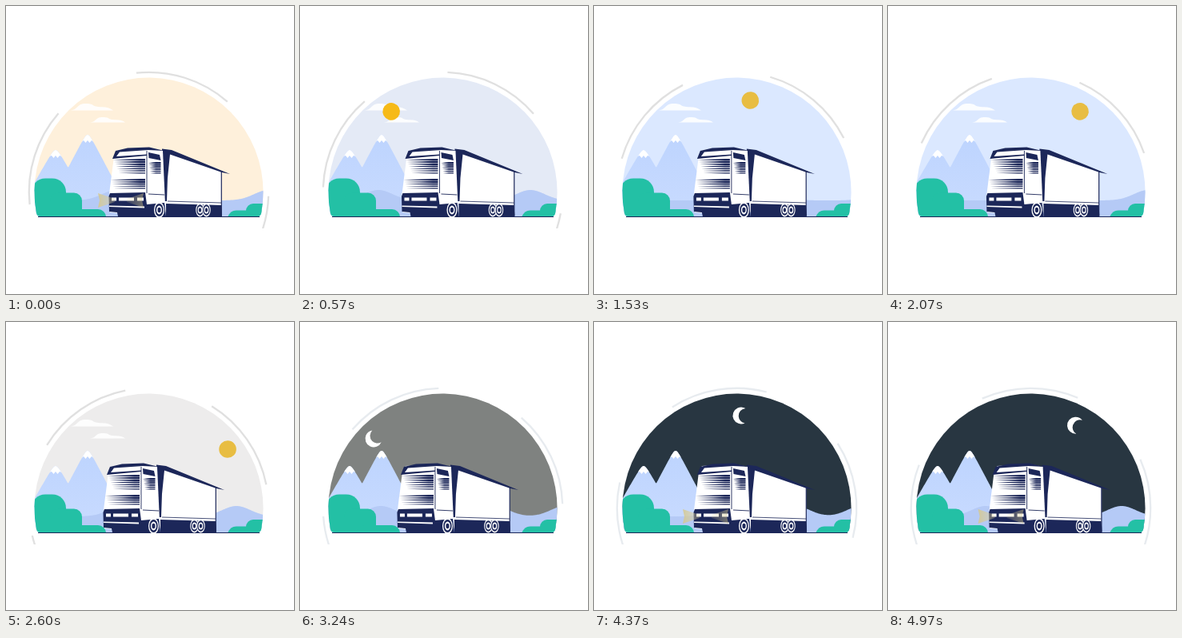
An HTML page with a canvas that plays this animation: 360 px wide and 360 px high, repeating every 5.01 s.

```html
<!DOCTYPE html>
<html lang="en">
<head>
<meta charset="utf-8">
<title>Truck, day and night</title>
<style>
html, body { margin: 0; width: 100%; height: 100%; overflow: hidden; background: #fff; }
canvas { display: block; width: 100vmin; height: 100vmin; }
</style>
</head>
<body>
<canvas id="stage" width="360" height="360"></canvas>
<script>
const ctx = document.getElementById('stage').getContext('2d');
const LOOP = 5.01, GROUND = 263;
const NAVY = '#1c2759', TEAL = '#23c0a5', WHITE = '#fff';
const CREAM = [254, 240, 219], BLUE = [219, 232, 255], NIGHT = [40, 54, 65];
const DOME = { x: 178.5, y: 232.5, r: 143 };
const rad = deg => deg * Math.PI / 180;
const ramp = (t, a, b) => Math.min(1, Math.max(0, (t - a) / (b - a)));
const mix = (a, b, k) => a.map((v, i) => v + (b[i] - v) * k);
const rgb = c => `rgb(${c.map(Math.round).join(',')})`;

function poly(color, ...p) {
  ctx.fillStyle = color;
  ctx.beginPath();
  for (let i = 0; i < p.length; i += 2) ctx.lineTo(p[i], p[i + 1]);
  ctx.fill();
}

function line(width, ...p) {
  ctx.strokeStyle = NAVY;
  ctx.lineWidth = width;
  ctx.beginPath();
  for (let i = 0; i < p.length; i += 2) ctx.lineTo(p[i], p[i + 1]);
  ctx.stroke();
}

function oval(color, x, y, rx, ry = rx) {
  ctx.fillStyle = color;
  ctx.beginPath();
  ctx.ellipse(x, y, rx, ry, 0, 0, 7);
  ctx.fill();
}

// Fills the land below y = height(x).
function land(color, from, to, height) {
  ctx.fillStyle = color;
  ctx.beginPath();
  ctx.moveTo(from, 270);
  for (let x = from; x <= to; x++) ctx.lineTo(x, height(x));
  ctx.lineTo(to, 270);
  ctx.fill();
}

function skyColor(t) {
  if (t < 2.2) return mix(CREAM, BLUE, ramp(t, 0, 0.76));
  if (t < 2.98) return mix(BLUE, CREAM, ramp(t, 2.2, 2.98));
  return mix(CREAM, NIGHT, ramp(t, 2.98, 3.42));
}

function rings(t) {
  ctx.save();
  ctx.beginPath();
  ctx.rect(0, 0, 360, 278);
  ctx.clip();
  ctx.lineWidth = 2.3;
  ctx.strokeStyle = rgb(mix([224, 224, 224], [231, 235, 239], ramp(t, 2.6, 3.2)));
  for (const start of [-188, -96, -6, 92]) {
    const a = start - 90 + 14.5 * t;
    ctx.beginPath();
    ctx.arc(DOME.x, DOME.y, 149.7, rad(a), rad(a + 47));
    ctx.stroke();
  }
  ctx.restore();
}

// Sun and moon share one circular track.
function onTrack(deg, alpha, draw) {
  if (alpha <= 0) return;
  ctx.save();
  ctx.globalAlpha = alpha;
  ctx.translate(177.2, 256);
  ctx.rotate(rad(deg));
  ctx.translate(0, -139.2);
  draw();
  ctx.restore();
}

function sun(t) {
  const color = rgb(mix([246, 186, 24], [232, 189, 66], ramp(t, 0.6, 1.5)));
  onTrack(35.85 * t - 47.4, ramp(t, 0.05, 0.3) * (1 - ramp(t, 2.9, 3.2)),
    () => oval(color, 0, 0, 10.8));
}

function moon(t) {
  const R = 10.5, r = 9.3, gap = 6;
  onTrack(35.85 * t - 153.9, ramp(t, 2.95, 3.2), () => {
    const tip = Math.acos((R * R + gap * gap - r * r) / (2 * R * gap));
    const inner = Math.atan2(R * Math.sin(tip), R * Math.cos(tip) - gap);
    ctx.fillStyle = WHITE;
    ctx.beginPath();
    ctx.arc(0, 0, R, tip, -tip);
    ctx.arc(gap, 0, r, -inner, inner, true);
    ctx.fill();
  });
}

function cloud(x, y, w, h) {
  ctx.fillStyle = WHITE;
  ctx.beginPath();
  ctx.moveTo(x, y);
  ctx.bezierCurveTo(x + w * 0.25, y, x + w * 0.15, y - h, x + w * 0.4, y - h);
  ctx.bezierCurveTo(x + w * 0.6, y - h, x + w * 0.5, y - h / 2, x + w * 0.75, y - h / 2);
  ctx.quadraticCurveTo(x + w * 0.9, y - h / 2, x + w, y);
  ctx.fill();
}

function mountains() {
  const peaks = [{ x: 62, y: 180, slope: 1.75 }, { x: 102, y: 161, slope: 1.92 }];
  const side = (p, x) => p.y + Math.hypot(p.slope * (x - p.x), 6) - 6;
  const g = ctx.createLinearGradient(0, 160, 0, GROUND);
  g.addColorStop(0, '#bdd4fe');
  g.addColorStop(1, '#c9dbff');
  land(g, 30, 160, x => Math.min(...peaks.map(p => side(p, x))));
  for (const p of peaks) {
    ctx.fillStyle = WHITE;
    ctx.beginPath();
    for (let dx = -7; dx <= 7; dx++) ctx.lineTo(p.x + dx, side(p, p.x + dx));
    for (let dx = 5; dx >= -5; dx -= 2.5) {
      ctx.lineTo(p.x + dx, p.y + (dx % 5 ? 10 : 7));
    }
    ctx.fill();
  }
}

const CRESTS = [138, 328, 470, 558, 640];

function hills(t) {
  const shift = 70 * t;
  land('#b5caf6', 30, 325, x =>
    CRESTS.reduce((y, c) => y - 13 * Math.exp(-(((x + shift - c) / 25) ** 2)), 243));
}

function bush(x, y, w, r) {
  ctx.fillStyle = TEAL;
  ctx.beginPath();
  ctx.roundRect(x, y, w, 80, r);
  ctx.fill();
}

function scenery(t) {
  mountains();
  hills(t);
  bush(32, 215.5, 43, 17);
  bush(55, 233.5, 40, 10);
  bush(70, 254, 55, 10);
  bush(277, 255.5, 60, 11);
  bush(300, 247, 60, 9);
}

// Stripes that get thinner and shorter towards the bottom.
function hatch(left, right, top, bottom, rows, inset) {
  const step = (bottom - top) / rows;
  for (let i = 0; i < rows; i++) {
    const y = top + i * step, h = step * (0.9 - 0.5 * i / rows);
    poly(NAVY, left + inset * i / rows, y + h / 2, right - 6, y, right, y, right, y + h, right - 6, y + h);
  }
}

function wheel(x, rx, ry) {
  [[WHITE, 1.25], [NAVY, 1], [WHITE, 0.68], [NAVY, 0.4]]
    .forEach(([color, k]) => oval(color, x, 255, rx * k, ry * k));
}

function beam(x, dir, alpha) {
  const g = ctx.createLinearGradient(x, 0, x + dir * 21, 0);
  g.addColorStop(0, 'rgba(222,208,150,.25)');
  g.addColorStop(1, 'rgba(214,200,140,.85)');
  ctx.globalAlpha = alpha;
  poly(g, x, 241, x + dir * 21, 234, x + dir * 19, 243, x + dir * 21, 252, x, 245);
  ctx.globalAlpha = 1;
}

function trailer() {
  poly(WHITE, 199, 181, 269.5, 207, 269.5, 255, 199, 258);
  poly(NAVY, 195, 178.5, 207, 180, 280, 210, 270, 208, 205, 185.5, 202, 215, 201, 244, 197, 244);
  line(1.2, 269.3, 207, 269.3, 262);
  line(0.8, 202, 244, 269, 246);
  poly(NAVY, 200, 247, 269, 249, 270, GROUND, 200, GROUND);
  wheel(242.5, 4.2, 6.8);
  wheel(250.5, 4.2, 6.8);
}

function cab() {
  poly(WHITE, 139, 180, 178, 177, 196, 181, 199, 248, 180, 262, 130, 258, 129, 235, 135, 188);
  poly(NAVY, 133, 191, 137, 181, 152, 177.5, 179, 176.5, 198, 181, 178, 180, 142, 182.5, 138, 188, 176, 185.5, 176, 187);
  // windscreen and grille
  hatch(134, 174, 191, 211, 7, 8);
  hatch(131, 174, 216, 230, 5, 4);
  line(0.9, 176, 181, 176, 234);
  // bumper and headlights
  poly(NAVY, 130, 234, 174, 233, 176, 248, 198, 246, 200, GROUND, 140, GROUND, 139, 258, 129, 257, 128.5, 238);
  poly(WHITE, 129, 249.5, 173, 250.5, 173, 252.5, 129, 251);
  for (const [x, w] of [[132, 6], [141, 19], [164, 8]]) {
    ctx.fillStyle = WHITE;
    ctx.fillRect(x, 239.5, w, 4);
  }
  // door
  poly(NAVY, 178, 183, 192, 186, 193.5, 193, 178.5, 190);
  hatch(178, 193.5, 195, 211, 6, 3);
  line(0.9, 178, 235, 198, 236);
  wheel(191.5, 5.2, 8);
}

function truck(t) {
  ctx.save();
  ctx.translate(-2.7 * (2.93 - Math.abs(t - 2.93)), 0);
  trailer();
  cab();
  const glow = Math.max(1 - ramp(t, 0.05, 0.35), ramp(t, 3.4, 3.7));
  if (glow > 0) {
    beam(136, -1, glow);
    beam(151, 1, glow * 0.55);
  }
  ctx.restore();
}

function dome() {
  const cut = Math.asin(26 / DOME.r), half = DOME.r * Math.cos(cut);
  const right = DOME.x + half, left = DOME.x - half;
  ctx.beginPath();
  ctx.arc(DOME.x, DOME.y, DOME.r, Math.PI - cut, cut);
  ctx.quadraticCurveTo(right - 1, GROUND, right - 5, GROUND);
  ctx.lineTo(left + 5, GROUND);
  ctx.quadraticCurveTo(left + 1, GROUND, left, DOME.y + 26);
}

function draw(t) {
  ctx.fillStyle = WHITE;
  ctx.fillRect(0, 0, 360, 360);
  rings(t);
  ctx.save();
  dome();
  ctx.clip();
  ctx.fillStyle = rgb(skyColor(t));
  ctx.fillRect(30, 80, 300, 190);
  ctx.globalAlpha = 0.9 * (1 - ramp(t, 2.7, 3.2));
  cloud(78, 130.5, 56, 8.5);
  cloud(103, 145.5, 46, 6.5);
  ctx.globalAlpha = 1;
  sun(t);
  moon(t);
  scenery(t);
  ctx.restore();
  line(1, 40, GROUND + 0.5, 317, GROUND + 0.5);
  truck(t);
}

function tick() {
  draw(performance.now() / 1000 % LOOP);
  requestAnimationFrame(tick);
}
tick();
</script>
</body>
</html>
```
